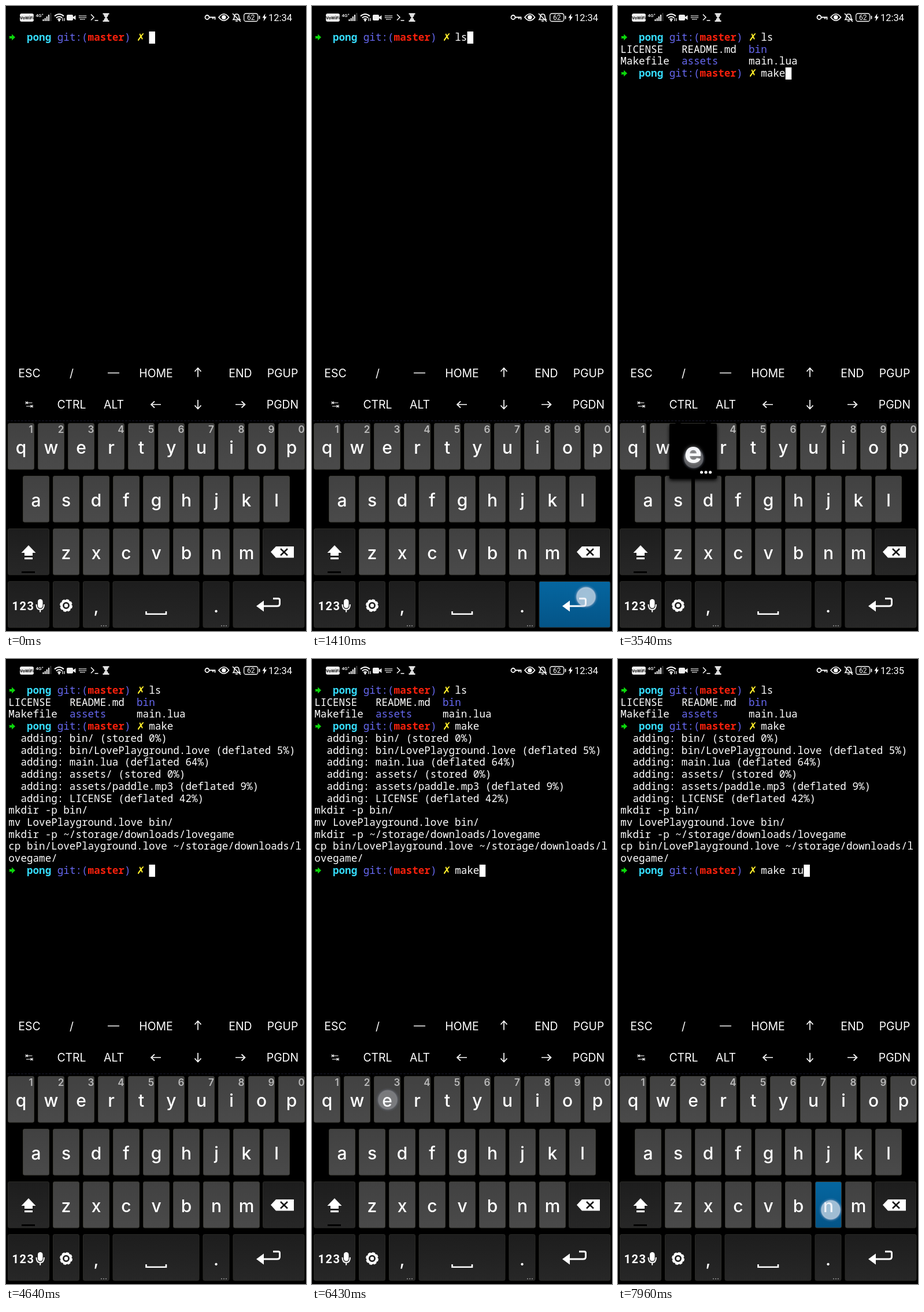
These frames come from a looping animation (519 by 1079 pixels, 8 s). An HTML page:

```html
<!DOCTYPE html>
<html lang="en">
<head>
<meta charset="utf-8">
<title>Phone terminal</title>
<style>
html, body { margin: 0; width: 100%; height: 100%; overflow: hidden; background: #000; }
svg { display: block; width: 100%; height: 100%; }
text { fill: #fff; font-family: Roboto, sans-serif; }
#term text { font: 17.6px "Noto Sans Mono", monospace; white-space: pre; }
#term .dir { fill: #35dafa; font-weight: 600; }
#term .blue { fill: #6668f0; font-weight: 500; }
#term .red { fill: #f8200c; font-weight: 700; }
#term .mark { fill: #fff02a; font-family: "DejaVu Sans", sans-serif; font-weight: 700; }
.mid { text-anchor: middle; }
#extra text, #keys text, #popup text { font-family: Inter, sans-serif; }
.extra { font-size: 19.4px; }
.letter { font-size: 30px; font-weight: 500; }
.digit { font-size: 17px; font-weight: 600; fill: #b8b8b8; }
.line { fill: none; stroke: #fff; }
</style>
</head>
<body>
<svg viewBox="0 0 519 1079" preserveAspectRatio="none">
  <defs>
    <linearGradient id="light" x2="0" y2="1"><stop stop-color="#414141"/><stop offset="1" stop-color="#4a4a4a"/></linearGradient>
    <linearGradient id="dark" x2="0" y2="1"><stop stop-color="#1d1d1d"/><stop offset="1" stop-color="#272727"/></linearGradient>
    <linearGradient id="press" x2="0" y2="1"><stop stop-color="#0566a0"/><stop offset="1" stop-color="#045487"/></linearGradient>
    <radialGradient id="dot">
      <stop stop-color="#f0f4fa" stop-opacity=".66"/><stop offset=".62" stop-color="#e8eaf2" stop-opacity=".68"/>
      <stop offset=".76" stop-color="#e0e4f0" stop-opacity=".74"/><stop offset=".85" stop-color="#aab4d0" stop-opacity=".25"/>
      <stop offset="1" stop-color="#8090c0" stop-opacity="0"/>
    </radialGradient>
    <filter id="shade" x="-20%" y="-20%" width="140%" height="140%"><feDropShadow dx="0" dy="3" stdDeviation="3" flood-color="#000"/></filter>
    <filter id="glow" x="-40%" y="-40%" width="180%" height="180%"><feDropShadow dx="0" dy="0" stdDeviation="3" flood-color="#fff" flood-opacity=".5"/></filter>
  </defs>
  <rect width="519" height="1079"/>

  <g id="status">
    <rect x="24" y="13" width="24" height="14" rx="3" fill="#eee"/>
    <text x="36" y="23.3" class="mid" style="font-size:7.6px;font-weight:700;fill:#111">VoWiFi</text>
    <text x="51.5" y="19" style="font-size:8px;font-weight:500">4G⁺</text>
    <path d="M64.5 23v3M67.7 21v5M70.9 18v8M74.1 15v11" class="line" stroke-width="2"/>
    <path d="M77.5 12v14" stroke="#666"/>
    <path d="M84 17.5q8-7 16 0M86.7 20.5q5.3-4.6 10.6 0M89.3 23.3q2.7-2.2 5.4 0" class="line" stroke-width="1.9"/>
    <circle cx="92" cy="25" r="1.7" fill="#fff"/>
    <path d="M98 21v5M101 21v5" class="line" stroke-width="1.2"/>
    <rect x="105" y="15" width="11" height="10" rx="2" fill="#eee"/><path d="M116 19l4.5-3v8l-4.5-3z" fill="#eee"/>
    <path d="M126 17h13M126 20h13M128 23h9" class="line" stroke-width="1.7" stroke-dasharray="1.6 .7"/>
    <path d="M147 14.5l5 5-5 5M153.5 25h6" class="line" stroke-width="1.5"/>
    <path d="M167.5 13.5h11M167.5 26h11" class="line" stroke-width="1.8"/>
    <path d="M169 14h8q0 4-3 6 3 2 3 6h-8q0-4 3-6-3-2-3-6z" fill="#ddd"/>
    <circle cx="348" cy="19.5" r="3.5" class="line" stroke-width="1.8"/><path d="M351.500 19.5h10v4M358 19.5v3" class="line" stroke-width="1.8"/>
    <path d="M368 19.5q9-11.5 17.5 0-8.5 11.5-17.5 0z" class="line" stroke-width="1.7"/><circle cx="376.8" cy="19.5" r="3.7" fill="#fff"/>
    <path d="M393 23.5q2-2 2-5 0-4.5 4-4.5t4 4.5q0 3 2 5zM397 26h4M392 13l14 14" class="line" stroke-width="1.6"/>
    <rect x="411.7" y="13" width="24" height="13.5" rx="3.5" class="line" stroke-width="1.3"/>
    <path d="M438.5 17v5.5" class="line" stroke-width="1.8"/>
    <text x="423.7" y="24" class="mid" style="font-size:12px">62</text>
    <path d="M448.5 13l-5 7.5h3l-1 6 5.5-8h-3.2z" fill="#fff"/>
    <text id="clock" x="495" y="25.7" text-anchor="end" style="font-size:16.5px"></text>
  </g>

  <g id="term"></g>
  <rect id="cursor" width="10.5" height="21" fill="#fff"/>

  <g id="extra">
    <path d="M332 640.5v-15M326.5 631l5.5-6 5.5 6M332 680v15M326.5 689.5l5.5 6 5.5-6M268 688h-16.5M257 682.5l-6 5.5 6 5.5M397 688h16.5M407.5 682.5l6 5.5-6 5.5M176 633.5h20" class="line" stroke-width="1.7"/>
    <path d="M34.5 682.5v5M35.5 685h10M38 683l-2.5 2 2.5 2M46 688.5v5M35 691h10M42.5 689l2.5 2-2.5 2" class="line" stroke-width="1.1"/>
    <path d="M2 716h515" stroke="#1b1b2c" stroke-dasharray="4 2"/>
  </g>
  <g id="keys"></g>
  <g id="icons">
    <path d="M39 931l12.5 13H46v5H32v-5h-5.5zM32 952h14v3.3H32z" fill="#fff"/>
    <path d="M27 977.5h23" stroke="#000" stroke-width="3"/>
    <path d="M458 942.5l9-9.5h31v19.5h-31z" fill="#fff"/><path d="M475 937l12 11.5M487 937l-12 11.5" stroke="#111" stroke-width="2.5"/>
    <text x="10.5" y="1043" style="font-size:20px;font-weight:700;letter-spacing:1.5px">123</text>
    <rect x="55" y="1024" width="8.5" height="15.5" rx="4.2" fill="#fff"/>
    <path d="M52.5 1033q0 9 6.700 9t6.7-9M59.2 1042v4.5" class="line" stroke-width="2"/>
    <circle cx="104" cy="1035" r="8" class="line" stroke-width="4"/>
    <circle cx="104" cy="1035" r="10.3" class="line" stroke-width="1.4" stroke-dasharray="5 3.09"/>
    <circle cx="104" cy="1035" r="3.2" fill="#fff"/>
    <path d="M242.5 1045v4.8h34.5v-4.800" class="line" stroke-width="2.6"/>
    <path d="M462 1023h9q2.500 0 2.5 2.500v6.5q0 4-4.5 4h-24" class="line" stroke-width="3"/>
    <path d="M433 1036l13-9.5v19z" fill="#fff"/>
    <path d="M164 1070h10M372 1070h10" stroke="#777" stroke-width="2" stroke-dasharray="2 2"/>
  </g>
  <g id="popup">
    <rect x="-41" width="82" height="95" rx="2" filter="url(#shade)"/>
    <text y="67.5" class="mid" style="font-size:51px;font-weight:700" filter="url(#glow)"></text>
    <path d="M14.500 84h.1M22 84h.1M29.500 84h.1" class="line" stroke-width="5" stroke-linecap="round"/>
  </g>
  <g id="touches"></g>
</svg>

<script>
const LOOP = 8000, COL = 10.56, ROW = 20.73, LEFT = 4.3;
const $ = id => document.getElementById(id);

function add(parent, tag, attrs, content) {
  const el = document.createElementNS("http://www.w3.org/2000/svg", tag);
  for (const k in attrs) el.setAttribute(k, attrs[k]);
  if (content) el.textContent = content;
  parent.append(el);
  return el;
}
const show = (el, on) => el.setAttribute("visibility", on ? "visible" : "hidden");

// Keyboard
const keys = {};
function key(name, x, y, w, dark) {
  const fill = `url(#${dark ? "dark" : "light"})`, stroke = dark ? "#2a2a26" : "#3b3b34";
  const el = add($("keys"), "rect", { x: x + 0.5, y: y + 0.5, width: w - 1, height: 79.5, rx: 2.5, fill, stroke });
  keys[name] = { x, y, w, el, fill };
}
function letters(row, x0, y) {
  [...row].forEach((c, i) => {
    const x = x0 + 52 * i;
    key(c, x, y, 46);
    add($("keys"), "text", { x: x + 23, y: y + 53, class: "letter mid" }, c);
  });
}
letters("qwertyuiop", 3, 720);
letters("asdfghjkl", 29, 811);
letters("zxcvbnm", 81, 902);
for (let i = 0; i < 10; i++)
  add($("keys"), "text", { x: 43 + 52 * i, y: 737, class: "digit mid" }, String((i + 1) % 10));
key("shift", 3, 902, 72, true);
key("back", 444, 902, 72, true);
key("123", 3, 993, 72, true);
key("gear", 81, 993, 46, true);
key(",", 133, 993, 46, true);
key(" ", 184.5, 993, 150, true);
key(".", 340.5, 993, 46, true);
key("\n", 392.5, 993, 124, true);
for (const c of ",.") add($("keys"), "text", { x: keys[c].x + 23, y: 1047, class: "letter mid" }, c);

[["ESC", "/", "", "HOME", "", "END", "PGUP"], ["", "CTRL", "ALT", "", "", "", "PGDN"]].forEach((row, r) =>
  row.forEach((s, i) => s && add($("extra"), "text", { x: 40.5 + 73 * i, y: 640.5 + 54.5 * r, class: "extra mid" }, s)));

// Terminal
const term = $("term"), rows = [], prompts = [];
function row(at, ...parts) {
  const g = add(term, "g", {}), y = 60 + ROW * rows.length;
  for (const [col, s, cls] of parts) add(g, "text", { x: LEFT + col * COL, y, class: cls || "" }, s);
  rows.push({ at, g });
  return { g, y };
}
function prompt(at) {
  const index = rows.length;
  const { g, y } = row(at, [3, "pong", "dir"], [8, "git:(", "blue"], [13, "master", "red"], [19, ")", "blue"], [21, "✗", "mark"]);
  add(g, "path", { d: `M5 ${y - 8}h5v-3.5l6 5.5-6 5.5v-3.5h-5l1.5-2z`, fill: "#0bd60b" });
  const input = add(g, "text", { x: LEFT + 23 * COL, y });
  prompts.push({ at, index, input });
}
const plain = (at, ...lines) => lines.forEach(s => row(at, [0, s]));

prompt(0);
row(1540, [0, "LICENSE"], [10, "README.md"], [21, "bin", "blue"]);
row(1540, [0, "Makefile"], [10, "assets", "blue"], [21, "main.lua"]);
prompt(1600);
plain(4190, ...["bin/ (stored 0%)", "bin/LovePlayground.love (deflated 5%)", "main.lua (deflated 64%)", "assets/ (stored 0%)",
  "assets/paddle.mp3 (deflated 9%)", "LICENSE (deflated 42%)"].map(s => "  adding: " + s));
plain(4260, "mkdir -p bin/", "mv LovePlayground.love bin/", "mkdir -p ~/storage/downloads/lovegame");
plain(4320, "cp bin/LovePlayground.love ~/storage/downloads/l", "ovegame/");
prompt(4440);

// Taps: key, down, up, x, y; a light tap does not tint its key
const taps = [
  ["l", 410, 520, 468, 858], ["s", 800, 910, 106, 862], ["\n", 1300, 1430, 474, 1020],
  ["m", 2560, 2680, 410, 940], ["a", 2785, 2900, 65, 863], ["k", 3030, 3140, 417, 858],
  ["e", 3370, 3480, 131, 781], ["\n", 3990, 4110, 476, 1022, true],
  ["m", 5420, 5530, 412, 944], ["a", 5680, 5790, 62, 862], ["k", 5940, 6050, 417, 858],
  ["e", 6240, 6350, 131, 761], [" ", 6830, 6970, 262, 1030], ["r", 7200, 7310, 183, 766],
  ["u", 7570, 7680, 338, 766], ["n", 7890, 8100, 368, 951]
].map(([name, down, up, x, y, light]) => ({
  name, down, up, light, dot: add($("touches"), "circle", { cx: x, cy: y, r: 21, fill: "url(#dot)" })
}));

const [, popText, popDots] = $("popup").children;

function draw(t) {
  $("clock").textContent = t < 6900 ? "12:34" : "12:35";
  for (const r of rows) show(r.g, t >= r.at);

  let active = 0, popped = null;
  const typed = prompts.map(() => "");
  for (const k in keys) keys[k].el.setAttribute("fill", keys[k].fill);
  for (const p of taps) {
    if (t >= p.up) {
      if (p.name === "\n") active++;
      else typed[active] += p.name;
    }
    const fade = t < p.down ? 0 : t < p.up ? 1 : Math.max(0, 0.85 * (1 - (t - p.up) / 180));
    p.dot.setAttribute("opacity", fade);
    if (!p.light && t >= p.down + 30 && t < p.up) keys[p.name].el.setAttribute("fill", "url(#press)");
    if (/[a-z]/.test(p.name) && t >= p.down + 80 && t < p.up + 70) popped = p.name;
  }
  prompts.forEach((p, i) => p.input.textContent = typed[i]);

  const busy = t < prompts[active].at;
  const line = busy ? rows.filter(r => t >= r.at).length : prompts[active].index;
  const col = busy ? 0 : 23 + typed[active].length;
  $("cursor").setAttribute("x", LEFT + col * COL + 0.3);
  $("cursor").setAttribute("y", Math.round(43.8 + line * ROW));

  show($("popup"), popped);
  if (popped) {
    const k = keys[popped];
    $("popup").setAttribute("transform", `translate(${k.x + 23} ${k.y + 1})`);
    popText.textContent = popped;
    popDots.setAttribute("opacity", "easlunr".includes(popped) ? 1 : 0);
  }
}

const start = performance.now();
function tick() {
  draw((performance.now() - start) % LOOP);
  requestAnimationFrame(tick);
}
tick();
</script>
</body>
</html>
```
